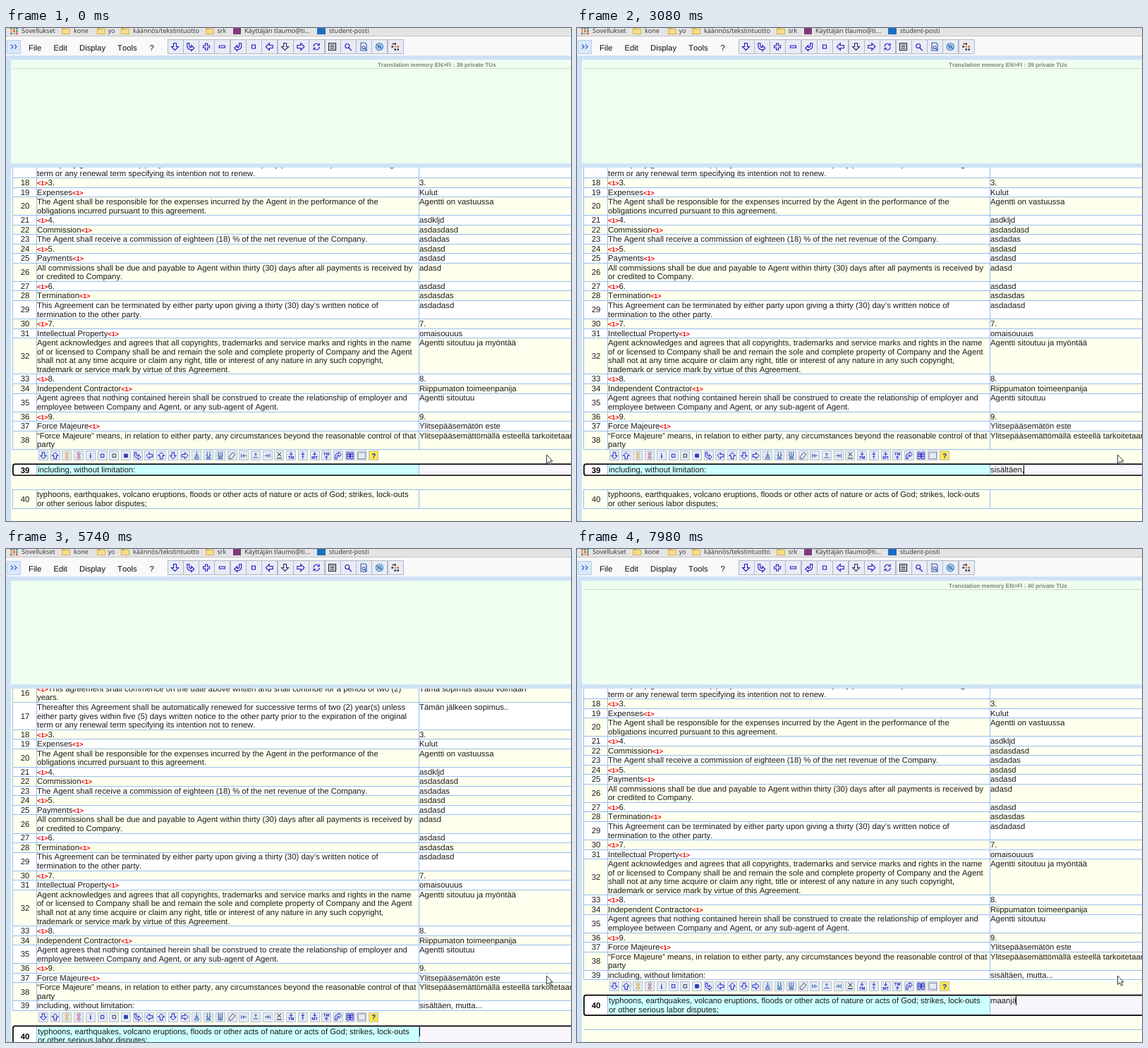
Recreate the animation shown at these times as an HTML page with a canvas. Size 801x699 px, loop 8000 ms.

```html
<!DOCTYPE html>
<html lang="en">
<head>
<meta charset="utf-8">
<title>Translation editor</title>
<style>
html, body { margin: 0; width: 100%; height: 100%; overflow: hidden; background: #ffe; }
canvas { display: block; }
</style>
</head>
<body>
<canvas id="stage" width="801" height="699"></canvas>
<script>
const ctx = document.getElementById('stage').getContext('2d');
const W = 801, H = 699, LOOP = 8000;
const SANS = '"Liberation Sans", Arial, sans-serif';
const BODY = `11.37px ${SANS}`, BOLD = `bold 11.37px ${SANS}`, TAG = `bold 9px ${SANS}`;
const BLUE = '#1818c0', LINE = '#97bdee', STRIP = '#cfe2f6', IVORY = '#ffffee';
const LINE_HEIGHT = 12.65, BORDER = 0.85, ASCENT = 10.1;
const COL_LEFT = 9, COL_SOURCE = 43, COL_TARGET = 585;

// number, source lines, target
const rows = [
  [16, '<1>This agreement shall commence on the date above written and shall continue for a period of two (2)|years.', 'Tämä sopimus astuu voimaan'],
  [17, 'Thereafter this Agreement shall be automatically renewed for successive terms of two (2) year(s) unless|either party gives within five (5) days written notice to the other party prior to the expiration of the original|term or any renewal term specifying its intention not to renew.', 'Tämän jälkeen sopimus..'],
  [18, '<1>3.', '3.'],
  [19, 'Expenses<1>', 'Kulut'],
  [20, 'The Agent shall be responsible for the expenses incurred by the Agent in the performance of the|obligations incurred pursuant to this agreement.', 'Agentti on vastuussa'],
  [21, '<1>4.', 'asdkljd'],
  [22, 'Commission<1>', 'asdasdasd'],
  [23, 'The Agent shall receive a commission of eighteen (18) % of the net revenue of the Company.', 'asdadas'],
  [24, '<1>5.', 'asdasd'],
  [25, 'Payments<1>', 'asdasd'],
  [26, 'All commissions shall be due and payable to Agent within thirty (30) days after all payments is received by|or credited to Company.', 'adasd'],
  [27, '<1>6.', 'asdasd'],
  [28, 'Termination<1>', 'asdasdas'],
  [29, 'This Agreement can be terminated by either party upon giving a thirty (30) day’s written notice of|termination to the other party.', 'asdadasd'],
  [30, '<1>7.', '7.'],
  [31, 'Intellectual Property<1>', 'omaisouuus'],
  [32, 'Agent acknowledges and agrees that all copyrights, trademarks and service marks and rights in the name|of or licensed to Company shall be and remain the sole and complete property of Company and the Agent|shall not at any time acquire or claim any right, title or interest of any nature in any such copyright,|trademark or service mark by virtue of this Agreement.', 'Agentti sitoutuu ja myöntää'],
  [33, '<1>8.', '8.'],
  [34, 'Independent Contractor<1>', 'Riippumaton toimeenpanija'],
  [35, 'Agent agrees that nothing contained herein shall be construed to create the relationship of employer and|employee between Company and Agent, or any sub-agent of Agent.', 'Agentti sitoutuu'],
  [36, '<1>9.', '9.'],
  [37, 'Force Majeure<1>', 'Ylitsepääsemätön este'],
  [38, '“Force Majeure” means, in relation to either party, any circumstances beyond the reasonable control of that|party', 'Ylitsepääsemättömällä esteellä tarkoitetaan'],
  [39, 'including, without limitation:', 'sisältäen, mutta...'],
  [40, 'typhoons, earthquakes, volcano eruptions, floods or other acts of nature or acts of God; strikes, lock-outs|or other serious labor disputes;', 'maanjä'],
].map(([no, source, target]) => ({ no, lines: source.split('|'), target }));

// time, typed length, caret visible
const typing = {
  39: [[0, 0, 0], [140, 1, 1], [280, 2, 1], [420, 3, 1], [700, 4, 1], [980, 5, 1], [1120, 6, 1],
    [1260, 7, 1], [1680, 7, 0], [1960, 8, 1], [2100, 9, 1], [2520, 9, 0], [3080, 10, 1],
    [3220, 11, 1], [3500, 12, 1], [3920, 13, 1], [4060, 14, 1], [4200, 15, 1], [4340, 16, 1],
    [4900, 17, 1], [5040, 18, 1], [5180, 19, 1], [5600, 19, 0]],
  40: [[5740, 0, 1], [6160, 0, 0], [6720, 0, 1], [7140, 0, 0], [7420, 1, 1], [7560, 2, 1],
    [7700, 3, 1], [7840, 4, 1], [7980, 6, 1]],
};
const CONFIRM = 5740, SETTLE = 5880, SCROLL = 43.6;

const shapes = {
  arrow: 'M-2-5H2V0H5L0 5-5 0H-2Z',
  both: 'M0-6L3-3H1V3H3L0 6-3 3H-1V-3H-3Z',
  hook: 'M-5-5H-2V-1Q-2 1 1 1V-2L5 2 1 6V4Q-5 4-5-1Z',
  plus: 'M-1.5-4.5H1.5V-1.5H4.5V1.5H1.5V4.5H-1.5V1.5H-4.5V-1.5H-1.5Z',
  minus: 'M-4-1.5H4V1.5H-4Z',
  box: 'M-2.5-2.5H2.5V2.5H-2.5Z',
  refresh: 'M-4 0A4 4 0 0 1 3-3M4 0A4 4 0 0 1-3 3M1-2H4V-5M-1 2H-4V5',
  list: 'M-5-5H5V5H-5ZM-3-2.5H3M-3 0H3M-3 2.5H3',
  lens: 'M2-1A3 3 0 1 1-4-1 3 3 0 1 1 2-1M1 1.5L5 5.5',
  page: 'M-4-5.5H2L4-3.5V5.5H-4ZM2 1A2 2 0 1 1-2 1 2 2 0 1 1 2 1M1.5 2.5L4 5',
  disc: 'M5 0A5 5 0 1 1-5 0 5 5 0 1 1 5 0M2 0A2 2 0 1 1-2 0 2 2 0 1 1 2 0M-4-3L4 3',
  drop: 'M0-6V1M-3-2L0 1 3-2M-3 2H3V5H-3Z',
  drop2: 'M-2-6V1M2-6V1M-4-1L0 2 4-1M-3 3H3V5H-3Z',
  drop3: 'M-3-6V1M0-6V1M3-6V1M-4 0L0 2 4 0M-3 3H3V5H-3Z',
  eraser: 'M-5 2L1-5 5-2-1 5H-4Z',
  toBar: 'M-4-3V3M4 0H-2M1-3L-2 0 1 3',
  rise: 'M-4 3H4M0-4V1M-2-2L0-4 2-2',
  cross: 'M-3-5L3 1M3-5L-3 1M-4 4H4',
  fall: 'M0-6V-1M-2.5-3L0-1 2.5-3',
  lift: 'M0 6V1M-2.5 3L0 1 2.5 3',
  columns: 'M-5-5H-1V5H-5ZM1-5H5V5H1ZM-5-2H5M-5 1H5',
  blank: 'M-6-5H6V5H-6Z',
  chevrons: 'M-4-3L-1 0-4 3M1-3L4 0 1 3',
};
for (const name in shapes) shapes[name] = new Path2D(shapes[name]);

// shape, options: turn (quarter turns), flip, color, fill, label, labelY
const mainIcons = [
  ['arrow'], ['hook'], ['plus'], ['minus'], ['hook', { flip: 1 }], ['box'], ['arrow', { turn: 1 }],
  ['arrow', { color: '#203060' }], ['arrow', { turn: 3 }], ['refresh'], ['list', { color: '#222', fill: '#dde' }],
  ['lens'], ['page', { color: '#3858a8' }], ['disc', { color: '#3c78b8', fill: '#b8d8f4' }], ['dots'],
];
const rowIcons = [
  ['arrow'], ['arrow', { turn: 2 }], ['both', { color: '#c8a050', fill: '#fff4c0' }], ['both', { color: '#b06088', fill: '#fbe0ea' }],
  ['', { label: 'i', size: 11 }], ['box'], ['box', { color: '#334' }], ['box', { fill: '#334c98' }], ['hook'],
  ['arrow', { turn: 1 }], ['arrow', { turn: 2 }], ['arrow'], ['arrow', { turn: 3 }],
  ['drop', { color: '#2858a0' }], ['drop2', { color: '#2858a0' }], ['drop3', { color: '#2858a0' }],
  ['eraser', { color: '#446' }], ['toBar', { color: '#2858a0' }], ['rise', { color: '#2858a0' }],
  ['toBar', { turn: 2, color: '#2858a0' }], ['cross', { color: '#111' }],
  ['fall', { label: 'TM', labelY: 5.5 }], ['fall', { label: 'T', labelY: 5.5 }], ['fall', { label: 'MT', labelY: 5.5 }],
  ['lift', { label: 'TM', labelY: -0.5 }], ['hook', { turn: 2, flip: 1 }], ['columns'],
  ['blank', { color: '#889', fill: '#e4eaf4' }], ['', { label: '?', size: 11, back: '#ffe84a' }],
];

function rect(x, y, w, h, color) {
  ctx.fillStyle = color;
  ctx.fillRect(x, y, w, h);
}

function text(str, x, y, font = BODY, color = '#1c1c1c', align = 'left') {
  ctx.font = font;
  ctx.fillStyle = color;
  ctx.textAlign = align;
  ctx.fillText(str, x, y);
}

function frameRect(x, y, w, h, fill, stroke) {
  rect(x, y, w, h, fill);
  ctx.strokeStyle = stroke;
  ctx.lineWidth = 1;
  ctx.strokeRect(x + 0.5, y + 0.5, w - 1, h - 1);
}

function icon(name, x, y, scale, { turn = 0, flip, color = BLUE, fill, label, labelY = 4, size = 6.5 } = {}) {
  ctx.save();
  ctx.translate(x, y);
  ctx.scale(flip ? -scale : scale, scale);
  ctx.rotate(turn * Math.PI / 2);
  if (name === 'dots') {
    for (const [dx, dy, c] of [[0, -4, '#222'], [-4, 0, '#222'], [4, 0, '#c05020'], [0, 4, '#222'], [0, 0, '#e08030'], [-3, -4, '#c05020'], [4, 4, '#222']])
      rect(dx - 1.2, dy - 1.2, 2.4, 2.4, c);
  } else if (name) {
    ctx.fillStyle = fill || 'transparent';
    ctx.fill(shapes[name]);
    ctx.strokeStyle = color;
    ctx.lineWidth = 1.1;
    ctx.stroke(shapes[name]);
  }
  if (label) text(label, 0, labelY, `bold ${size}px ${SANS}`, color, 'center');
  ctx.restore();
}

function drawBookmarks() {
  rect(0, 0, W, 11, '#e4e4e4');
  rect(0, 11, W, 1, '#c4c4c4');
  for (let i = 0; i < 9; i++)
    rect(6 + i % 3 * 4, Math.floor(i / 3) * 3.6 - 0.6, 2.6, 2.6, ['#d8503c', '#4a9a50', '#4878c8', '#e0a830'][i % 4]);
  for (const x of [79, 129, 163, 283]) {
    rect(x, 0, 5, 2, '#d8b050');
    frameRect(x, 1, 12, 8, '#f8dc88', '#d8b050');
  }
  rect(322, 0, 11, 9, '#80397b');
  rect(441, 0, 12, 9, '#1a6fc0');
  const names = [['Sovellukset', 22], ['kone', 96], ['yo', 144.5], ['käännös/tekstintuotto', 180], ['srk', 299.5],
    ['Käyttäjän tlaumo@ti...', 338], ['student-posti', 458]];
  for (const [name, x] of names) text(name, x, 7.4, '9.1px "Open Sans", sans-serif', '#333');
}

function drawMenu() {
  rect(0, 12, W, 27, '#f9f9fa');
  frameRect(1, 17, 20, 20, '#d9e8fa', '#b4cdec');
  icon('chevrons', 11, 26.5, 1, { color: '#2c5cc0' });
  for (const [name, x] of [['File', 32], ['Edit', 67.5], ['Display', 104], ['Tools', 158], ['?', 203.5]])
    text(name, x, 32, `11.3px ${SANS}`, '#111');
  mainIcons.forEach(([name, options], i) => {
    const x = 239.5 + i * 22.3;
    frameRect(Math.round(x - 11), 16, 23, 21, '#e9ecf5', '#b2b8c6');
    icon(name, x, 26.5, 1, options);
  });
}

function drawMemoryPanel(count) {
  rect(0, 39, W, H - 39, STRIP);
  rect(7, 45, W, 147, '#efffef');
  if (!count) return;
  text(`Translation memory EN>FI : ${count} private TUs`, 527, 55, `bold 8.23px ${SANS}`, '#7c847c');
  rect(9, 57, W, 1, '#cfdccf');
}

function drawTagged(str, x, y) {
  for (const part of str.split(/(<1>)/)) {
    const tag = part === '<1>';
    text(part, x, y, tag ? TAG : BODY, tag ? '#f00000' : undefined);
    x += ctx.measureText(part).width;
  }
}

const hline = y => rect(COL_LEFT, Math.round(y), W, 1, LINE);

function drawRow({ no, lines, target }, y) {
  const height = lines.length * LINE_HEIGHT + BORDER;
  const baseline = y + BORDER + ASCENT;
  rect(COL_LEFT, y, W, height, no % 2 ? '#fff' : IVORY);
  hline(y);
  hline(y + height);
  for (const x of [COL_LEFT, COL_SOURCE, COL_TARGET])
    rect(x, Math.round(y), 1, Math.round(y + height) - Math.round(y), LINE);
  text(no, 27, y + height / 2 + 4.2, BODY, '#1c1c1c', 'center');
  lines.forEach((line, i) => drawTagged(line, 44, baseline + i * LINE_HEIGHT));
  text(target, 586, baseline);
  return y + height;
}

function drawActiveRow({ no, lines, target }, y, [, length, caret]) {
  rowIcons.forEach(([name, options = {}], i) => {
    const x = 53 + i * 16.72, middle = y + 9.6;
    frameRect(Math.round(x - 7), Math.round(middle - 7), 14, 14, options.back || '#e3eaf6', '#b6c0d2');
    icon(name, x, middle, 0.9, options);
  });

  const top = y + 20.8 + 0.8 * lines.length;
  const height = lines.length * LINE_HEIGHT + 3.2;
  const lineTop = top + 1.2, baseline = lineTop + ASCENT + 0.1;
  rect(10, top, 34, height, '#fff');
  rect(COL_SOURCE + 1, top, COL_TARGET - COL_SOURCE - 1, height, '#ccffff');
  rect(COL_TARGET, top, W, height, '#f8f6fa');
  rect(COL_SOURCE, top, 1, height, LINE);
  rect(COL_TARGET, top, 1, height, LINE);
  ctx.strokeStyle = '#000';
  ctx.lineWidth = 1.7;
  ctx.beginPath();
  ctx.roundRect(9.9, top, W + 20, height, 3);
  ctx.stroke();

  text(no, 27, top + height / 2 + 4.2, BOLD, '#000', 'center');
  lines.forEach((line, i) => text(line, 45, baseline + i * LINE_HEIGHT));
  const typed = target.slice(0, length);
  text(typed, 586, baseline);
  if (caret) {
    const x = Math.max(586, Math.floor(585.73 + ctx.measureText(typed).width));
    rect(x, Math.round(lineTop), 1, 13, '#000');
  }
  const bottom = top + height + 20.2;
  hline(bottom);
  return bottom;
}

function drawTable(active, state, scroll) {
  ctx.save();
  ctx.beginPath();
  ctx.rect(7, 198, W, H);
  ctx.clip();
  rect(7, 198, W, H, IVORY);
  let y = 147.15 + scroll;
  for (const row of rows)
    y = row.no === active ? drawActiveRow(row, y, state) : drawRow(row.no > active ? { ...row, target: '' } : row, y);
  ctx.restore();
}

const pointer = new Path2D('M766.5 605V617.5L769.5 614.8 771.6 619.3 773.5 618.4 771.5 614H775Z');
function drawPointer() {
  ctx.fillStyle = '#fff';
  ctx.fill(pointer);
  ctx.strokeStyle = '#222';
  ctx.lineWidth = 0.9;
  ctx.stroke(pointer);
}

function draw(time) {
  const active = time < CONFIRM ? 39 : 40;
  const scrolled = time >= CONFIRM && time < SETTLE;
  const state = typing[active].findLast(([start]) => time >= start);
  ctx.textRendering = 'geometricPrecision';
  ctx.fontKerning = 'none';
  drawBookmarks();
  drawMenu();
  drawMemoryPanel(scrolled ? 0 : active);
  drawTable(active, state, scrolled ? SCROLL : 0);
  drawPointer();
}

const start = performance.now();
function tick() {
  draw((performance.now() - start) % LOOP);
  requestAnimationFrame(tick);
}
tick();
</script>
</body>
</html>
```
